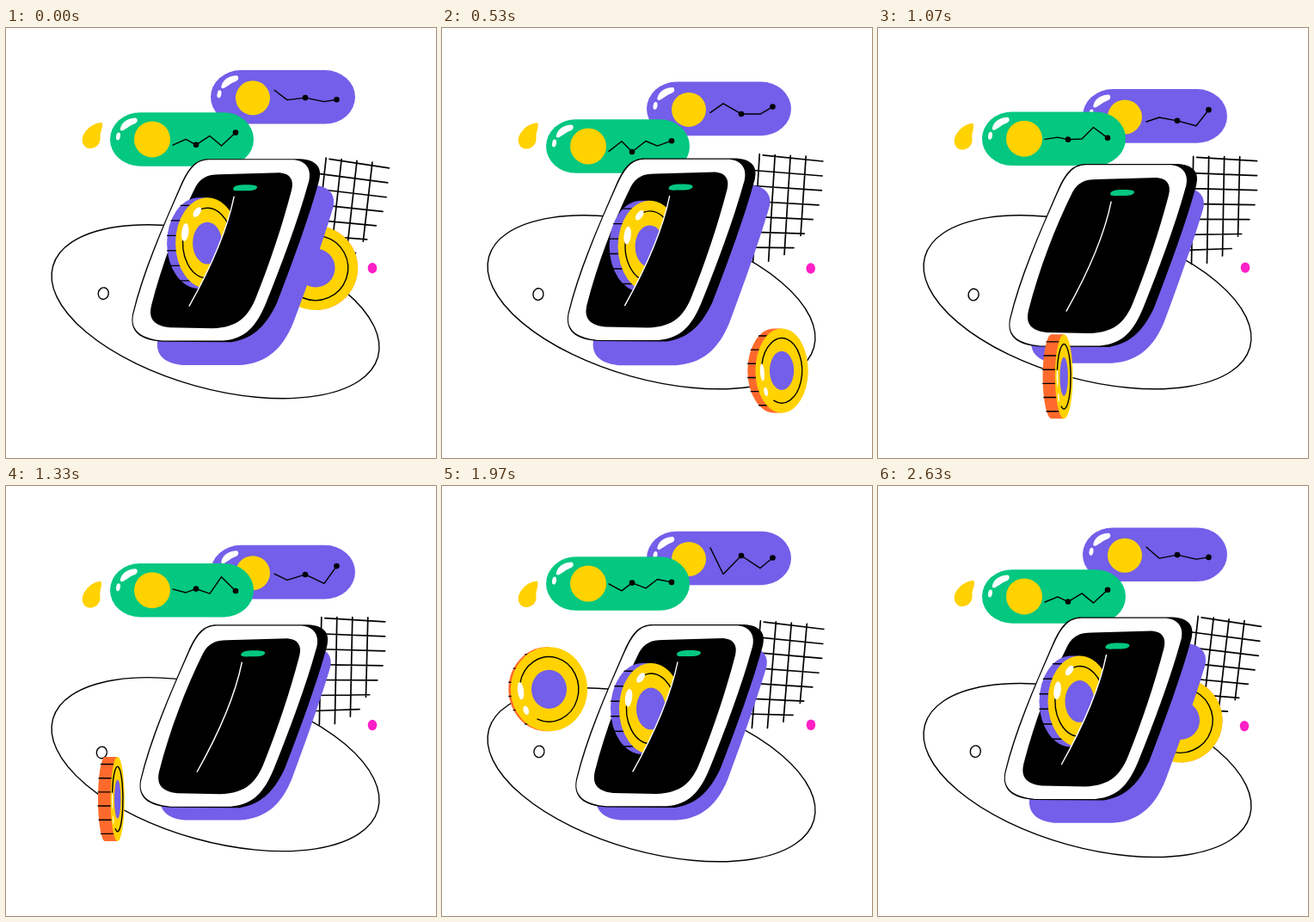
Recreate the animation shown at these times as an HTML page. Size 500x500 px, loop 2.67 s.

```html
<!DOCTYPE html>
<html lang="en">
<head>
<meta charset="utf-8">
<title>Crypto wallet</title>
<style>
html, body { margin: 0; width: 100%; height: 100%; overflow: hidden; background: #fff; }
svg { display: block; width: 100%; height: 100%; }
.line { fill: none; stroke: #000; stroke-width: 1.4; stroke-linejoin: round; stroke-linecap: round; }
.ring { vector-effect: non-scaling-stroke; }
.white { fill: #fff; }
.purple { fill: #735fe9; }
.yellow { fill: #ffd200; }
.green { fill: #04c780; }
.orange { fill: #ff6a2c; }
</style>
</head>
<body>
<svg viewBox="0 0 500 500">
  <defs>
    <clipPath id="slitClip">
      <path d="M265 196Q254 250 213 323L100 323L100 100L265 100Z"/>
    </clipPath>
    <g id="shine" class="white">
      <path d="M133 116C135 108 143 104 151 104C154 106 153 110 149 111C143 113 139 118 135 119Q132 119 133 116Z"/>
      <ellipse cx="130.500" cy="125.500" rx="2.400" ry="4.500" transform="rotate(10 130.500 125.500)"/>
    </g>
  </defs>

  <path id="grid" class="line" style="stroke-width:1.7"/>
  <ellipse id="orbit" class="line" rx="196.2" ry="89.4"/>
  <g id="back"></g>

  <path id="shadow" class="purple" d="M340 180L362 183C378 186 384 196 380 210C368 250 350 300 334 343C322 372 304 390 272 392L205 392C184 390 174 380 176 364L200 300Z"/>

  <g id="pillA">
    <rect class="purple" x="238" y="48.700" width="168" height="62.600" rx="35" ry="31.300"/>
    <circle class="yellow" cx="287" cy="81" r="20"/>
    <use href="#shine" x="117.500" y="-49"/>
    <path id="lineA" class="line"/>
    <circle id="dotA1" r="3.300"/><circle id="dotA2" r="3.300"/>
  </g>

  <g id="pillB">
    <rect class="green" x="121" y="97.700" width="167" height="62.600" rx="35" ry="31.300"/>
    <circle class="yellow" cx="170" cy="129" r="21"/>
    <use href="#shine"/>
    <path id="lineB" class="line"/>
    <circle id="dotB1" r="3.300"/><circle id="dotB2" r="3.300"/>
  </g>

  <path id="drop" class="yellow" d="M112 110C114 116 109 121 110 128C110 136 104 140 98 140C91 140 87 132 90 125C94 117 102 110 112 110Z"/>
  <ellipse id="pink" rx="5.300" ry="6.200" fill="#ff1fc7"/>
  <ellipse id="egg" class="line" rx="6" ry="6.800"/>

  <g id="phone">
    <path d="M236 152L342 152C360 153 368 161 364 177C352 221 333 272 315 319C304 343 289 361 262 365L182 364.500C156 363 143 353 147 332C158 285 180 235 203 182C212 162 220 152 236 152Z"/>
    <path class="white" d="M236 153.200L335 153.200C350 155 355 165 352 178C339 225 320 275 302 320C291 346 279 361 252 363.400L182 363.400C158 361 144 352 148 333C159.500 286 180.500 236 203.700 184C212.700 164 221 153.200 236 153.200Z"/>
    <path d="M248 170L318 168C330 169 335 176 332 188C321 230 307 272 291 312C282 335 270 348 240 349L190 348C172 346 165 338 169 322C181 275 200 225 220 185C226 174 234 170 248 170Z"/>
    <path class="green" d="M264 187C264 183 271 182 278 182C285 182 292 182 292 185C291 189 284 189 278 189C271 189 264 190 264 187Z"/>
    <g clip-path="url(#slitClip)"><g id="slotCoin"></g></g>
    <path class="line" style="stroke:#fff" d="M265 196Q254 250 213 323"/>
  </g>
  <g id="front"></g>
</svg>

<script>
const LOOP = 2670, STEP = 100 / 3;
const $ = id => document.getElementById(id);
const set = (node, attrs) => { for (const k in attrs) node.setAttribute(k, attrs[k]); };
const move = (id, x, y, rest = '') => set($(id), { transform: `translate(${x} ${y})${rest}` });
const wave = (t, peak) => Math.cos(2 * Math.PI * (t - peak) / LOOP);
const clamp = v => Math.min(1, Math.max(0, v));

const polar = (r, deg) => {
  const a = deg * Math.PI / 180;
  return `${r * Math.cos(a)} ${r * Math.sin(a)}`;
};

// Coin face on a radius of 100, with a side wall behind it.
function makeCoin(host, wall, ringFrom, ringTo, glosses) {
  const shine = glosses.map(([x, y, rx, ry, tilt]) =>
    `<ellipse class="white" rx="${rx}" ry="${ry}" transform="translate(${x} ${y}) rotate(${tilt})"/>`).join('');
  host.innerHTML = `<g><path class="${wall}"/><path class="line"/><g>
    <circle class="yellow" r="100"/>
    <path class="line ring" d="M${polar(77, ringFrom)}A77 77 0 1 1 ${polar(77, ringTo)}"/>
    <circle class="purple" r="46"/>${shine}</g></g>`;
  const root = host.firstChild, [side, ticks, face] = root.children;
  return { root, side, ticks, face };
}

function poseCoin(coin, x, y, rx, ry, wall, dir) {
  const w = dir * wall, sweep = dir > 0 ? 1 : 0;
  set(coin.root, { transform: `translate(${x} ${y})` });
  set(coin.side, { d: `M0 ${-ry}L${w} ${-ry}A${rx} ${ry} 0 0 ${sweep} ${w} ${ry}L0 ${ry}Z` });
  let d = '';
  for (let k = -2.5; k <= 2.5 && wall > 2.5; k++) {
    const ty = k * ry * 0.33, edge = dir * rx * Math.sqrt(1 - (ty / ry) ** 2);
    d += `M${edge} ${ty}L${edge + w} ${ty}`;
  }
  set(coin.ticks, { d });
  set(coin.face, { transform: `scale(${rx / 100} ${ry / 100})` });
}

const orbitCoin = makeCoin($('front'), 'orange', 191, 113,
  [[-74, 4, 8, 21, -8], [-60, 50, 7, 11, -20]]);
const slotCoin = makeCoin($('slotCoin'), 'purple', 255, 195,
  [[-70, -24, 11, 20, 12], [-32, -68, 15, 8, -35]]);
poseCoin(slotCoin, 234, 250, 37, 53, 10, -1);

// Hand-drawn net: rows and columns shorten towards the lower right.
function net() {
  let d = '';
  for (let i = 0; i < 7; i++) {
    const right = 38 - 2.6 * Math.max(0, i - 2) ** 1.75;
    d += `M${i ? -45 : -32} ${18 * i - 57}L${right} ${17 * i - 53}`;
  }
  for (let j = 0; j < 4; j++) {
    const x = 18 * j - 36;
    d += `M${x} -58L${x - 2} ${67 - 1.2 * j ** 3}`;
  }
  return d;
}
set($('grid'), { d: net() });

// Chart points: x, middle height, swing, time of the lowest position
const CHART_A = [
  [312, 28, 10.7, 874], [327, 37.3, 12.4, 1899], [348, 32.8, 4.9, 754],
  [370, 40.3, 4.5, 1532], [384.5, 29, 5.4, 2508]
];
const CHART_B = [
  [194, 33.7, 4.5, 197], [209, 32.3, 7.1, 1913], [221, 33.4, 5, 274],
  [237, 31, 6.4, 1716], [250.5, 27, 11.5, 0], [267, 27.5, 4.6, 1477]
];

function chart(name, points, top, t) {
  const pts = points.map(([x, mid, swing, low]) => [x, top + mid + swing * wave(t, low)]);
  set($('line' + name), { d: 'M' + pts.map(p => p.join(' ')).join('L') });
  [pts[2], pts[pts.length - 1]].forEach(([cx, cy], i) => set($(`dot${name}${i + 1}`), { cx, cy }));
}

// Flying coin: time, x, y, turn in degrees; each lap adds half a turn.
const FLIGHT = [
  [0, 360, 279, 0], [530, 391, 398, 51], [1070, 208, 405, 78],
  [1630, 56, 302, 97], [1970, 124, 236, 205], [2300, 218, 234, 190]
];
const LAP = [LOOP, 0, 0, 180];

// Smooth periodic curve through the flight points
function flight(t) {
  const n = FLIGHT.length;
  const at = i => {
    const lap = Math.floor(i / n);
    return FLIGHT[i - lap * n].map((v, k) => v + lap * LAP[k]);
  };
  let i = n - 1;
  while (FLIGHT[i][0] > t) i--;
  const [a, b, c, d] = [at(i - 1), at(i), at(i + 1), at(i + 2)];
  const h = c[0] - b[0], u = (t - b[0]) / h, v = 1 - u;
  return [1, 2, 3].map(k => {
    const m0 = (c[k] - a[k]) / (c[0] - a[0]) * h;
    const m1 = (d[k] - b[k]) / (d[0] - b[0]) * h;
    return v * v * ((1 + 2 * u) * b[k] + u * m0) + u * u * ((1 + 2 * v) * c[k] - v * m1);
  });
}

function fly(t) {
  const [x, y, turn] = flight(t), a = turn * Math.PI / 180;
  const sin = Math.sin(a), cos = Math.cos(a);
  const wall = 15 * sin * sin, dir = sin * cos > 0 ? -1 : 1;
  poseCoin(orbitCoin, x - dir * wall / 2, y, Math.max(0.5, 49 * Math.abs(cos)), 49, wall, dir);
  const layer = $(t > 250 && t < 1985 ? 'front' : 'back');
  if (orbitCoin.root.parentNode !== layer) layer.appendChild(orbitCoin.root);
}

function draw(t) {
  const sway = 4.7 - 6 * wave(t, 300);
  move('phone', sway, sway);
  move('shadow', 280, 290, ` scale(${1 - 0.0038 * sway}) translate(-280 -290)`);

  const inside = t < 1100 ? clamp((t - 330) / 570) : clamp((1892 - t) / 592);
  const slide = 95 * inside ** 2.4;
  move('slotCoin', slide, slide * 0.53);

  move('pillA', 0, 10.2 + 12.2 * wave(t, 1070));
  move('pillB', 0, -3.7 + 12.2 * wave(t, 520));
  chart('A', CHART_A, 49, t);
  chart('B', CHART_B, 98, t);

  move('orbit', 243.5, 326.7 - 9.8 * wave(t, 800), ' rotate(15.6)');
  move('grid', 402.6, 211.4 - 5.7 * wave(t, 720), ` rotate(${2.8 + 2.8 * wave(t, 2500)})`);
  move('drop', -0.4, 0.8 - 0.8 * wave(t, 0), ` rotate(${2 * wave(t, 0) - 2} 99 129)`);
  move('pink', 427.5 - 1.5 * wave(2 * t, 0), 278.6 + wave(t, 400));
  move('egg', 112.3 + 1.2 * wave(t, 2400), 309.3 - 0.8 * wave(t, 2400), ' rotate(12)');
  fly(t);
}

const start = performance.now();
function tick() {
  const ms = (performance.now() - start) % LOOP;
  draw(Math.min(79, Math.floor((ms + 4) / STEP)) * STEP);
  requestAnimationFrame(tick);
}
tick();
</script>
</body>
</html>
```
